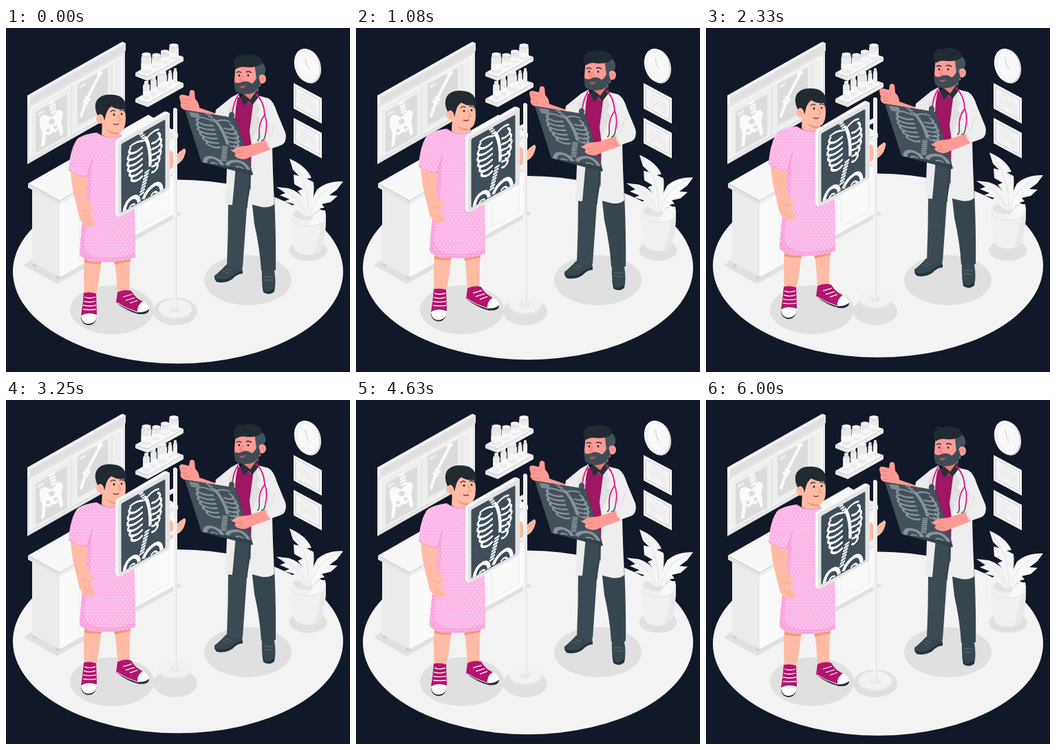
Recreate the animation shown at these times as an HTML page with a canvas. Size 500 px wide and 500 px high, loop 6.04 s.

```html
<!DOCTYPE html>
<html lang="en">
<head>
<meta charset="utf-8">
<title>X-ray room</title>
<style>
html, body { margin: 0; width: 100%; height: 100%; overflow: hidden; background: #111827; }
canvas { display: block; width: 100%; height: 100%; }
</style>
</head>
<body>
<canvas id="stage"></canvas>
<script>
const canvas = document.getElementById('stage');
const ctx = canvas.getContext('2d');
const LOOP = 6040, FPS = 24;
const SKIN = '#ffbba4', SKIN_DARK = '#f0997c', TAN = '#ff9b95', TAN_DARK = '#e87a74';
const INK = '#263238', SLATE = '#37474f', FILM = '#3f4e59', PLUM = '#9f1663', PINK = '#fbb6e6';

function fill(color, d) {
  ctx.fillStyle = color;
  ctx.fill(new Path2D(d));
}
function line(color, width, d) {
  ctx.strokeStyle = color;
  ctx.lineWidth = width;
  ctx.stroke(new Path2D(d));
}
function oval(color, x, y, rx, ry, turn = 0) {
  ctx.fillStyle = color;
  ctx.beginPath();
  ctx.ellipse(x, y, rx, ry, turn, 0, Math.PI * 2);
  ctx.fill();
}
function group(draw, ...matrix) {
  ctx.save();
  ctx.transform(...matrix);
  draw();
  ctx.restore();
}
const shift = (dy, draw) => group(draw, 1, 0, 0, 1, 0, dy);

// Linear rise and fall, highest at half a period
function bob(sec, period, height) {
  const p = (sec / period) % 1;
  return -height * (1 - Math.abs(1 - 2 * p));
}

function shadows() {
  oval('#e0e0e0', 154, 409.5, 61, 35.5);
  oval('#e0e0e0', 246, 412, 32, 20);
  oval('#e0e0e0', 351.5, 366.5, 63.5, 36.5);
  oval('#e0e0e0', 439, 323, 27.5, 15.5);
}

function cabinet() {
  fill('#e0e0e0', 'M26 345L74 372L256 270L238 260L38 336Z');
  for (const [x, y] of [[42, 343], [76, 361], [227, 275], [239, 269]]) {
    fill('#d0d0d0', `M${x - 3} ${y - 4}h6v7q-3 2-6 0Z`);
  }
  fill('#ebebeb', 'M38 231L78 255V362L38 341Z');
  fill('#fafafa', 'M78 255L243 162V271L78 362Z');
  line('#ececec', 1, 'M107 250V340L190 293V202M197 200V289L237 267V176M197 229L237 207');
  fill('#f7f7f7', 'M32 226L207 126L250 153L78 251Z');
  fill('#e3e3e3', 'M32 226L78 251V257L32 232Z');
  fill('#ededed', 'M78 251L250 153V159L78 257Z');
}

function viewer() {
  fill('#e6e6e6', 'M31 110L173 31V117L31 198Z');
  fill('#f5f5f5', 'M34 116L170 39V113L34 191Z');
  fill('#eeeeee', 'M37 117L167 44V112L37 186Z');
  line('#d9d9d9', .8, 'M36 189L171 113M95 85V155M154 52V119');
  fill('#dcdcdc', 'M43 122L89 96V157L43 182Z');
  fill('#dcdcdc', 'M104 82L148 57V118L104 142Z');
  fill('#efefef', 'M46 124L55 119V123L46 128Z M107 84L116 79V83L107 88Z');
  // pelvis
  for (let i = 0; i < 4; i++) fill('#fafafa', `M${62 + i} ${109 + i * 4.4}l8-4l1 3l-8 4Z`);
  fill('#fafafa', 'M49 137Q48 128 56 126L66 130L75 120Q82 117 83 126L80 136Q82 141 83 154L79 157L76 146Q74 153 68 151Q62 158 58 154L56 171L51 173L53 152Q49 146 49 137Z');
  oval('#dcdcdc', 66.5, 136, 4.5, 4, -.5);
  oval('#dcdcdc', 61, 149, 3, 2.5, -.5);
  oval('#dcdcdc', 72, 144, 2.8, 2.5, -.5);
  // long bones
  ctx.lineCap = 'round';
  line('#fafafa', 4, 'M136 68L118 102M116 108L109 128');
  line('#fafafa', 5.5, 'M135 67L138 65M117 102L120 104M114 107L117 109');
  ctx.lineCap = 'butt';
  fill('#f2f2f2', 'M31 98L169 20L174 22V33L35 112L31 110Z');
  fill('#e0e0e0', 'M35 101L174 22V33L35 112Z');
  fill('#f4f4f4', 'M31 98L35 101V112L31 110Z');
}

function bottle(x, base, w, h, neck) {
  const r = w / 2, top = base - h;
  fill('#ebebeb', `M${x - r} ${top + 8}Q${x - r} ${top + 5} ${x - neck} ${top + 4}H${x + neck}Q${x + r} ${top + 5} ${x + r} ${top + 8}V${base - 2}Q${x} ${base + 3} ${x - r} ${base - 2}Z`);
  fill('#f7f7f7', `M${x - r} ${top + h * .5}q${r} 3 ${w} 0v${h * .27}q${-r} 3 ${-w} 0Z`);
  fill('#e2e2e2', `M${x - neck} ${top + 1}h${neck * 2}v5q${-neck} 2 ${-neck * 2} 0Z`);
  oval('#f5f5f5', x, top + 1, neck, neck * .4);
}

function shelf(dy) {
  shift(dy, () => {
    fill('#f8f8f8', 'M188 65L240 36L258 42L206 71Z');
    fill('#e8e8e8', 'M188 65L206 71V77L188 70Z');
    fill('#efefef', 'M206 71L258 42V48L206 77Z');
  });
}

function shelves() {
  shelf(0);
  bottle(244, 46, 14, 22, 6.5);
  bottle(231, 51, 13, 18, 6);
  bottle(218.5, 58, 13, 20, 6);
  bottle(204, 66, 15, 29, 6.5);
  shelf(38);
  bottle(246, 80, 6, 22, 2);
  bottle(238.5, 84, 6, 23, 2);
  bottle(227, 92, 14, 29, 6);
  bottle(214.5, 99, 9, 29, 3);
  bottle(204, 104, 10, 27, 3);
}

function clock() {
  oval('#dedede', 439.5, 55.5, 18, 25.5, -.28);
  oval('#fafafa', 437, 54.5, 17.5, 25, -.28);
  oval('#ededed', 437, 54.5, 14.5, 21.5, -.28);
  oval('#f8f8f8', 437.5, 54.5, 13.3, 20.5, -.28);
  line('#d0d0d0', 1.2, 'M435 43L437 54L441 60');
}

function diploma(dy) {
  shift(dy, () => {
    fill('#fafafa', 'M418 80L459 102V139L418 117Z');
    fill('#dedede', 'M420 84L457 104V135L420 115Z');
    fill('#f3f3f3', 'M422 87L455 105V132L422 114Z');
    line('#dcdcdc', .9, 'M430 96L447 105M426 99L451 112.5M426 103L451 116.5M426 107L451 120.5M427 112L434 115.8M444 121L451 125');
  });
}

function plant() {
  fill('#f0f0f0', 'M414 273Q415 261 439 261Q464 261 465 273Q465 300 460 317Q458 329 439 330Q420 329 418 317Q413 298 414 273Z');
  oval('#e2e2e2', 439.5, 271, 22, 8.5);
  fill('#e8e8e8', 'M457 283Q463 279 465 273Q465 300 460 317Q458 326 447 329Q456 306 457 283Z');
  line('#e4e4e4', 1.2, 'M415 278Q421 288 440 288Q460 287 464 277');
  fill('#f2f2f2', 'M393 231L411 233Q428 238 437 254L441 274L433 272Q424 261 412 261L419 256L404 252L412 249L398 243L406 240Z');
  fill('#f8f8f8', 'M490 223Q466 222 452 235Q444 248 440 272L447 272Q452 262 463 261L459 256L472 253L482 244L470 243L481 235Z');
  fill('#f5f5f5', 'M412 190Q436 200 444 218L437 219L447 224Q449 240 443 272L437 272Q437 250 424 237L431 234L419 227L418 213L426 215L417 206Z');
  line('#dfdfdf', 1, 'M414 193Q441 222 440 272M396 233Q425 242 437 270M487 225Q450 237 443 271');
  fill('#f7f7f7', 'M464 265Q448 264 440 287Q455 287 464 279L456 277L465 272Z');
}

const GOWN = 'M131 152Q149 163 168 156L178 161Q188 210 188 333Q162 343 126 339Q110 336 107 329Q110 280 116 248L118 216Q103 215 91 206Q93 177 103 162Q110 155 131 152Z';

function dots() {
  ctx.save();
  ctx.clip(new Path2D(GOWN));
  ctx.fillStyle = 'rgba(255,242,252,.8)';
  for (let r = 0; r < 44; r++) {
    for (let x = 91 + (r % 2) * 3; x < 190; x += 6) ctx.fillRect(x, 155 + r * 4.3, 1.4, 1.4);
  }
  ctx.restore();
}

function patient() {
  // hand holding the far side
  fill(SKIN, 'M228 184L240 178Q247 188 252 180L259 175Q263 176 260 184Q257 195 247 199L238 206L228 207Z');
  line(SKIN_DARK, .8, 'M247 188L253 184L259 180');
  // legs
  fill(SKIN, 'M114 332L139 333Q137 360 131 389L114 389Q112 360 114 332Z');
  fill(SKIN, 'M157 333L181 330Q179 360 179 387L162 388Q161 358 157 333Z');
  fill(SKIN_DARK, 'M114 336Q127 342 139 339L138 343Q124 343 114 341ZM157 340L181 336V339L158 344Z');
  // shoes
  fill(INK, 'M109 417Q108 430 119 432Q131 432 132 418Z');
  fill('#b3146f', 'M113 385Q122 383 131 386L132 417Q120 414 109 418Q112 401 113 385Z');
  fill('#fff', 'M109 418Q119 412 132 417Q132 429 120 430Q110 430 109 418Z');
  fill(INK, 'M160 399Q176 412 193 416Q208 417 208 409L190 405Z');
  fill('#b3146f', 'M162 384Q172 379 182 382Q188 393 200 398L193 413Q174 408 160 399Z');
  fill('#fff', 'M199 397Q207 401 208 408Q203 414 191 413Q190 403 199 397Z');
  line('#fff', 1.3, 'M114 391Q121 394 130 391M113 397Q121 400 130 397M112 403Q121 405 131 403M112 409Q121 410 131 409M170 391L183 387M174 396L187 392M180 400L191 396');
  line('#fff', 1, 'M161 399Q174 408 191 413');
  // neck
  fill(SKIN, 'M140 134L164 142L167 157Q151 163 139 155Z');
  fill(SKIN_DARK, 'M145 146Q153 152 164 152L163 155Q151 155 145 146Z');
  fill(PINK, GOWN);
  fill('#f8a4dd', 'M118 216L124 195Q126 240 117 285Q113 310 115 321Q122 334 150 334Q174 333 188 326V333Q162 343 126 339Q110 336 107 329Q110 280 116 248Z');
  dots();
  line('#f18fd2', 1.2, 'M91 206Q104 216 118 216L126 190M131 152Q149 164 168 156');
  // near arm
  fill(SKIN, 'M94 208Q106 216 118 217L117 245L121 255Q131 262 125 267L122 268L130 284Q129 289 121 289Q108 285 106 273L102 256Q95 230 94 208Z');
  line(SKIN_DARK, .8, 'M112 264L122 268M113 275L121 286M119 276L126 286');
  shift(1, head);
}

function head() {
  fill(SKIN, 'M140 111Q157 105 173 115L174 130Q174 146 167 150Q157 152 147 147Q140 143 139 137Z');
  oval(SKIN, 137, 131, 6, 7, -.2);
  line(SKIN_DARK, 1, 'M135 128Q140 130 138 135');
  fill('#202a30', 'M133 126Q127 113 132 104Q139 94 156 96Q170 97 174 109Q176 118 173 123L171 117Q161 118 153 113Q147 117 145 126L143 134Q142 125 137 124Z');
  oval(INK, 157, 125, 1.4, 1.8);
  oval(INK, 168, 124, 1.3, 1.7);
  line(INK, 1.3, 'M152 121Q155 117 159 120M165 119Q169 117 171 120');
  line(SKIN_DARK, 1.2, 'M163 125L167 133L162 134');
  line('#8d3f3c', 1.5, 'M156 138Q160 141 164 138');
}

// Rib cage on a 63 by 100 sheet
function skeleton(color) {
  const mark = (w, d) => line(color, w, d);
  for (let i = 0; i < 4; i++) fill(color, `M${26 + i * 2} ${i * 4}h6v2.7h-6Z`);
  ctx.lineCap = 'round';
  for (let i = 0; i < 6; i++) {
    const v = 17 + i * 8.4, out = 5 * Math.sin((i + 1) * .55);
    const left = 13 - out, right = 55 + out;
    mark(3.2, `M${left + 3} ${v - 3}Q${left - 1} ${v + 1} ${left + 3} ${v + 4}Q${left + 10} ${v + 9} 30 ${v + 5}`);
    mark(3, `M${right - 4} ${v - 3}Q${right + 1} ${v + 2} ${right - 3} ${v + 6}Q${right - 7} ${v + 9} 45 ${v + 7}`);
  }
  mark(2.6, 'M31 13Q22 8 13 11M39 11Q47 6 54 9');
  mark(4.5, 'M36 12Q43 30 42 54');
  ctx.lineCap = 'butt';
  for (let i = 0; i < 8; i++) fill(color, `M${34 - i * 1.1} ${60 + i * 4}l7-1v2.8l-7 1Z`);
  mark(5, 'M4 102Q6 87 16 87Q25 88 26 99M59 102Q58 86 48 86Q36 88 32 98');
  mark(2.5, 'M11 102Q14 94 20 99M53 102Q50 93 43 99');
}

function sheet(w, h, color, bones) {
  ctx.save();
  ctx.beginPath();
  ctx.roundRect(0, 0, w, h, 2);
  ctx.fillStyle = color;
  ctx.fill();
  ctx.clip();
  skeleton(bones);
  ctx.restore();
}

function stand() {
  oval('#e8e8e8', 246, 410, 24, 13.5);
  oval('#f1f1f1', 246, 407.5, 24, 13.5);
  oval('#e6e6e6', 246, 409, 7, 4);
  for (const y of [151, 212]) {
    fill('#f1f1f1', `M234 ${y}L246 ${y - 6}V${y + 1}L234 ${y + 7}Z`);
    fill('#dedede', `M234 ${y + 5}L246 ${y - 1}V${y + 1}L234 ${y + 7}Z`);
  }
  fill('#e9e9e9', 'M243 118Q246 114 249 118V409Q246 412 243 409Z');
  fill('#f3f3f3', 'M243 118Q244 116 246 116V411Q244 411 243 409Z');
  fill('#f7f7f7', 'M159 167Q159 163 163 161L229 122Q233 120 238 124V231Q238 235 233 238L168 273Q162 276 159 271Z');
  fill('#e3e3e3', 'M163 169Q163 165 167 163L232 126Q238 123 238 128V230Q238 234 234 236L169 272Q163 275 163 269Z');
  group(() => sheet(64, 100, FILM, '#fff'), 1, -.555, 0, 1, 167.5, 168.5);
}

function doctor() {
  // trousers and shoes
  fill(SLATE, 'M303 360Q311 354 320 344L343 346L344 355Q336 357 329 364Q319 371 306 368Q302 365 303 360Z');
  fill(INK, 'M303 364Q319 368 328 361Q335 355 344 353V357Q336 357 329 365Q318 372 306 369Z');
  fill(SLATE, 'M372 352L390 353Q393 370 390 383Q384 389 376 385Q371 375 372 352Z');
  fill(INK, 'M372 371L374 384Q382 389 390 383V378Q382 385 376 382Z');
  line('#607079', .9, 'M315 353L324 357M319 350L328 353M375 361L388 362M375 366L388 367');
  fill('#3b4a53', 'M328 195L360 200L350 262L344 348Q331 351 321 346Q323 300 323 252Z');
  fill('#37464e', 'M347 195L388 210Q393 290 392 352Q381 357 371 353Q369 320 361 285L354 222Z');
  line('#2c3941', 1, 'M354 215L350 262');
  // thumb up
  fill(TAN, 'M252 101Q252 96 258 97L266 99L267 92Q270 88 274 92L275 103Q281 109 281 116L313 127L308 139L275 124Q264 121 257 118Q252 114 254 109Z');
  line(TAN_DARK, .9, 'M254 103L264 104M255 109L264 110M258 115L266 115M267 100Q270 104 268 107');
  // coat and shirt
  fill('#ebebeb', 'M338 95L327 101L305 119L302 140L325 158L321 205L319 255Q324 258 329 257L335 190L352 150Z');
  fill(PLUM, 'M336 101L361 98L363 180L356 200L333 180Q331 130 336 101Z');
  fill('#eeeeee', 'M361 97L381 102Q389 106 394 123L406 152Q409 165 397 169L387 173Q388 220 390 256Q383 262 371 260L355 256L357 165Z');
  fill('#e0e0e0', 'M361 97L369 119L364 127L370 133L358 162V180L354 150ZM338 95L333 120L329 130L322 120Z');
  line('#d9d9d9', 1, 'M387 173L380 148L377 136M387 173Q384 150 391 138');
  // neck and head
  fill(TAN_DARK, 'M345 82L367 79L366 99L356 111L345 100Z');
  fill(INK, 'M344 95L355 104L365 90L369 98L358 112L352 106L346 113L341 102Z');
  fill(TAN, 'M334 50L369 50L370 84Q356 96 341 91Q332 87 332 75Z');
  oval(TAN, 372, 74, 6, 7);
  line(TAN_DARK, 1, 'M370 73Q374 70 374 76');
  fill('#3d4c54', 'M331 78Q337 82 344 78Q352 76 357 81Q364 77 366 66L370 81Q366 92 357 95Q342 99 333 91Z');
  fill('#b95a5b', 'M339 84Q344 86 349 83Q346 89 341 87Z');
  fill('#43535b', 'M361 49Q374 46 377 58Q378 66 374 68Q368 66 367 74L364 75Z');
  fill('#202b31', 'M332 56Q328 43 336 44Q333 37 344 40Q356 36 366 41Q373 45 372 51Q366 58 350 57Q340 55 334 60Z');
  oval(INK, 339, 69, 1.3, 1.8);
  oval(INK, 352, 69, 1.3, 1.8);
  line(INK, 1.5, 'M335 65Q338 62 342 65M349 64Q353 62 357 65');
  line(TAN_DARK, 1.3, 'M344 69L340 76L345 77');
  // stethoscope
  line('#ec0f8c', 1.8, 'M338 97Q331 107 329 123M363 96Q375 106 376 126Q367 138 368 153M376 126Q381 138 377 155');
  line('#51616a', 1.8, 'M368 153Q369 163 365 164M377 155Q376 164 371 164');
  oval('#43535b', 328, 127, 4.2, 5);
  // film
  fill('#34424b', 'M260 119L334 131L359 213L357 214L284 195Z');
  group(() => sheet(63, 100, '#43515b', '#87939a'), 1.16, .19, .245, .76, 260, 119);
  fill('#7d8990', 'M266 122L280 124L283 132L269 129Z');
  // forearm over the film
  fill(TAN, 'M386 160L352 171L342 172Q333 173 328 179L334 182Q330 186 337 189Q346 193 354 188L386 176Z');
  line(TAN_DARK, .9, 'M334 182L343 180M337 187L345 184');
  fill('#eeeeee', 'M388 149L406 153Q409 168 398 171L384 176Q377 168 378 161L392 154Z');
  line('#d9d9d9', 1, 'M379 161Q380 169 385 175');
}

function draw(sec) {
  const k = Math.min(canvas.width, canvas.height) / 500;
  ctx.setTransform(k, 0, 0, k, 0, 0);
  ctx.fillStyle = '#111827';
  ctx.fillRect(0, 0, 500, 500);
  const sway = bob(sec, 1.5, 10), slide = bob(sec, 6, 19.6);
  shift(sway, () => oval('#f3f3f3', 250, 354.1, 240, 133.6));
  shadows();
  viewer();
  shelves();
  clock();
  diploma(0);
  diploma(50.5);
  cabinet();
  shift(sway, () => { plant(); patient(); });
  shift(slide, stand);
  shift(sway, doctor);
}

function resize() {
  const d = devicePixelRatio || 1;
  canvas.width = innerWidth * d;
  canvas.height = innerHeight * d;
}

const start = performance.now();
function tick() {
  const t = Math.max(0, performance.now() - start) % LOOP;
  draw(Math.floor((t + 5) * FPS / 1000) / FPS);
  requestAnimationFrame(tick);
}
addEventListener('resize', resize);
resize();
tick();
</script>
</body>
</html>
```
